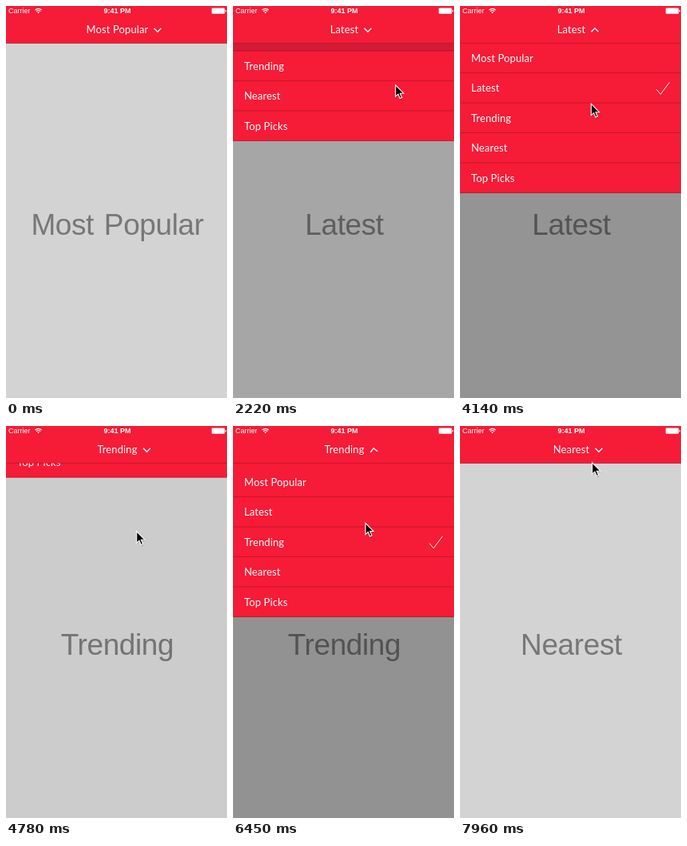
Write an HTML page that moves like this. It is 277x490 px and loops after 7.99 s.

```html
<!DOCTYPE html>
<html lang="en">
<head>
<meta charset="utf-8">
<title>Dropdown menu</title>
<style>
  html, body { margin: 0; width: 100%; height: 100%; overflow: hidden; background: #d3d3d3; }
  svg { display: block; width: 277px; height: 490px; }
  text { fill: #fff; }
  .ui { font: 13px Lato, sans-serif; letter-spacing: .12px; }
  .sys { font: 9px "Liberation Sans", Arial, sans-serif; }
  .clock { font-weight: bold; }
  .big {
    font: 37px "Liberation Sans", Arial, sans-serif;
    letter-spacing: -.4px; word-spacing: 3px; fill: #777;
  }
  .mid { text-anchor: middle; }
  .line { fill: none; stroke: #fff; }
</style>
</head>
<body>
<svg viewBox="0 0 277 490">
  <rect width="277" height="490" fill="#d3d3d3"/>
  <text id="big" class="big mid" x="139.5" y="286"></text>
  <rect id="shade" width="277" height="490" opacity="0"/>
  <g id="menu"><rect y="-253.5" width="277" height="487.5" fill="#f61b36"/></g>

  <rect width="277" height="46.5" fill="#f61b36"/>
  <rect y="46" width="277" height=".7" opacity=".25"/>
  <text class="sys" x="2.9" y="9.4">Carrier</text>
  <g class="line" stroke-width="1.1">
    <path d="M36.4 5.1A6 6 0 0 1 44.8 5.1M38 6.8A3.7 3.7 0 0 1 43.2 6.8"/>
    <path d="M40.6 9.3L39.2 7.9A2 2 0 0 1 42 7.9Z" fill="#fff" stroke="none"/>
  </g>
  <text class="sys clock mid" x="139.5" y="9.4">9:41 PM</text>
  <rect x="257.8" y="2.4" width="16.4" height="7.4" rx="1.2" fill="#fff"/>
  <rect x="274.8" y="4.9" width="1.2" height="2.4" rx=".6" fill="#fff"/>
  <text id="title" class="ui mid" x="139.5" y="34.2"></text>
  <path id="arrow" class="line" stroke-width="1.4" d="M-4.5 -2.3L0 2.3L4.5 -2.3"/>

  <g id="cursor">
    <path d="M.8 1.2V15.6L4.1 12.5L6.4 18L8.9 17L6.6 11.6H11.1Z" opacity=".22" transform="translate(.6 1.2)"/>
    <path d="M.7 .9V15.2L4 12.1L6.3 17.5L8.7 16.5L6.4 11.2H10.9Z" stroke="#fff" stroke-width="1.1"/>
  </g>
</svg>
<script>
const LOOP = 7990, ROW = 37.5, TOP = 46.5, DIM = 0.3;
const items = ['Most Popular', 'Latest', 'Trending', 'Nearest', 'Top Picks'];
const arrowX = [190, 169, 176.5, 174];
const H = ROW * items.length;
const opens = [1070, 3550, 6020], closes = [1960, 4367, 6968.5];

// time, x, y of the pointer tip
const path = [
  [640, 279, 30], [900, 187.5, 18], [1400, 187.5, 18], [1800, 203, 98],
  [2480, 203, 98], [2760, 217, 53], [3190, 170, 31], [3720, 170, 31],
  [4240, 163, 131], [5230, 163, 131], [5500, 254, 215], [5880, 163, 29],
  [6200, 163, 29], [6650, 167, 185], [7550, 167, 185], [7960, 165, 45]
];

const $ = id => document.getElementById(id);
const el = (name, attrs, parent) => {
  const n = document.createElementNS('http://www.w3.org/2000/svg', name);
  for (const k in attrs) n.setAttribute(k, attrs[k]);
  return parent.appendChild(n);
};
const move = (n, x, y, extra = '') => n.setAttribute('transform', `translate(${x} ${y})${extra}`);
const show = (n, on) => { n.style.display = on ? '' : 'none'; };
const clamp = v => Math.min(1, Math.max(0, v));
const smooth = p => p * p * (3 - 2 * p);

// cubic-bezier(.42, 0, .58, 1)
function ease(p) {
  p = clamp(p);
  let a = 0, b = 1, u = p;
  for (let i = 0; i < 22; i++) {
    u = (a + b) / 2;
    const x = 1.26 * u * (1 - u) ** 2 + 1.74 * u * u * (1 - u) + u ** 3;
    if (x < p) a = u; else b = u;
  }
  return smooth(u);
}

// damped spring from 0 to 1, ratio 0.7, settling in 750 ms
function spring(ms) {
  const t = ms / 1000, w = 9.4 * t;
  return 1 - Math.exp(-9.2 * t) * (Math.cos(w) + 0.979 * Math.sin(w));
}

const menu = $('menu');
const rows = items.map((name, i) => {
  const g = el('g', { transform: `translate(0 ${TOP + i * ROW})` }, menu);
  const glow = el('rect', { width: 277, height: ROW, fill: '#d31b37' }, g);
  el('rect', { y: ROW - 0.8, width: 277, height: 0.8, opacity: 0.25 }, g);
  el('text', { x: 14, y: 23.2, class: 'ui' }, g).textContent = name;
  const check = el('path', { d: 'M246.3 20.3L251.4 26.4L262.6 11.4', class: 'line', 'stroke-width': 1 }, g);
  return { glow, check };
});

function pointer(t) {
  const i = path.findIndex(k => k[0] > t);
  if (i === 0) return null;
  if (i < 0) return path[path.length - 1].slice(1);
  const [t0, x0, y0] = path[i - 1], [t1, x1, y1] = path[i];
  const p = smooth((t - t0) / (t1 - t0));
  return [x0 + (x1 - x0) * p, y0 + (y1 - y0) * p];
}

function draw(t) {
  const opened = opens.filter(v => v <= t).length;
  const sel = closes.filter(v => v <= t).length;
  const isOpen = opened > sel;
  let y = -H, dim = 0, turn = 0;
  if (isOpen) {
    const ms = t - opens[opened - 1], s = spring(ms);
    y = -H * (1 - s);
    dim = DIM * s;
    turn = 180 * ease(ms / 500);
  } else if (sel) {
    // the downward bounce and the exit add up
    const ms = t - closes[sel - 1], e = ease(ms / 500);
    y = -H - 2 * ROW * (1 - spring(ms)) + (H + 2 * ROW) * (1 - e);
    dim = DIM * (1 - e * e);
    if (e > 0.999) y = -H;
  }
  move(menu, 0, y);
  $('shade').setAttribute('opacity', dim);
  $('big').textContent = $('title').textContent = items[sel];
  move($('arrow'), arrowX[sel], 30, ` rotate(${turn})`);
  rows.forEach((r, i) => {
    show(r.check, i === sel);
    show(r.glow, i === sel && sel && !isOpen);
  });
  const p = pointer(t);
  show($('cursor'), p);
  if (p) move($('cursor'), p[0], p[1]);
}

const start = performance.now();
function tick() {
  draw((performance.now() - start) % LOOP);
  requestAnimationFrame(tick);
}
tick();
</script>
</body>
</html>
```
